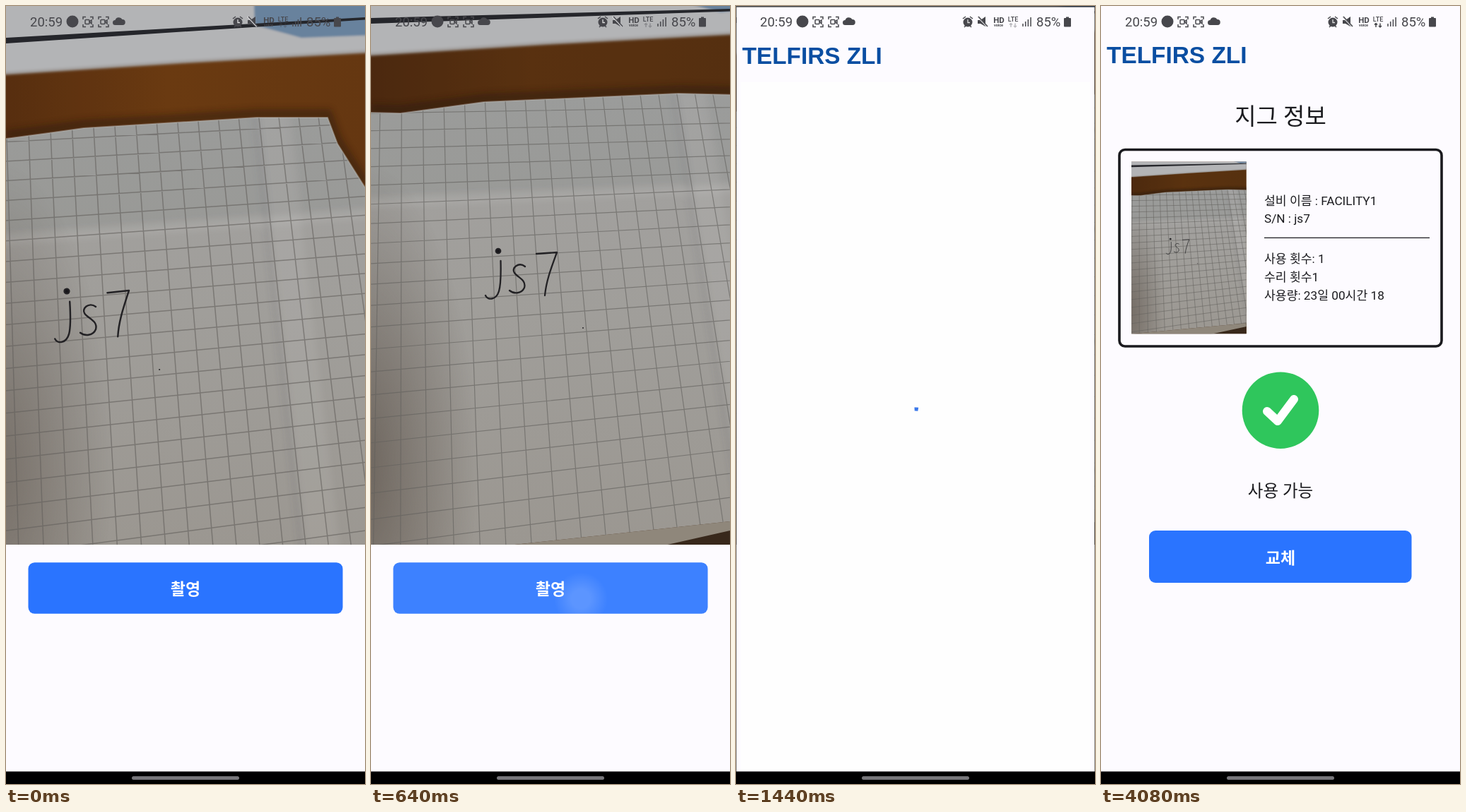
Write an HTML page that moves like this. It is 508 px wide and 1102 px high and loops after 4160 ms.

```html
<!DOCTYPE html>
<html lang="ko">
<head>
<meta charset="utf-8">
<title>Jig check</title>
<style>
html, body { margin: 0; width: 100%; height: 100%; overflow: hidden; background: #fdfbff; }
svg { display: block; width: 100vw; height: 100vh; }
text { font-family: Roboto, "Noto Sans CJK KR", sans-serif; fill: #1b1b1f; }
.mid { text-anchor: middle; }
.btn { fill: #2a74ff; }
.btnText { fill: #fff; font-size: 23px; font-weight: 700; text-anchor: middle; }
.row { font-size: 17.2px; }
.brand { font: bold 33.4px "Liberation Sans", sans-serif; fill: #0a4ea2; }
.line { fill: none; stroke: #48484d; stroke-width: 1.5; }
#status text { fill: #47474c; }
#status { fill: #47474c; }
</style>
</head>
<body>
<svg viewBox="0 0 508 1102" preserveAspectRatio="none">
<defs>
  <linearGradient id="wood">
    <stop offset="0" stop-color="#5d3110"/><stop offset=".45" stop-color="#713e12"/><stop offset="1" stop-color="#6c3b12"/>
  </linearGradient>
  <linearGradient id="sheet" gradientUnits="userSpaceOnUse" x1="300" y1="110" x2="240" y2="763">
    <stop offset="0" stop-color="#a3a2a1"/><stop offset=".5" stop-color="#a09e9a"/><stop offset="1" stop-color="#9b9791"/>
  </linearGradient>
  <radialGradient id="warm" gradientUnits="userSpaceOnUse" cx="0" cy="0" r="1" gradientTransform="translate(-15 650) scale(165 430)">
    <stop offset="0" stop-color="#3d3026"/><stop offset="1" stop-color="#3d3026" stop-opacity="0"/>
  </radialGradient>
  <radialGradient id="glow">
    <stop offset=".35" stop-color="#fff"/><stop offset="1" stop-color="#fff" stop-opacity="0"/>
  </radialGradient>
  <filter id="soft" filterUnits="userSpaceOnUse" x="0" y="0" width="508" height="763"><feGaussianBlur id="blur" stdDeviation="0"/></filter>
  <filter id="edgeBlur" filterUnits="userSpaceOnUse" x="-20" y="-120" width="548" height="903"><feGaussianBlur stdDeviation="1.500"/></filter>
  <filter id="haze" filterUnits="userSpaceOnUse" x="-20" y="-20" width="548" height="803"><feGaussianBlur stdDeviation="5"/></filter>
  <clipPath id="view"><rect width="508" height="763"/></clipPath>
  <clipPath id="paperClip"><path id="paperCut"/></clipPath>
  <clipPath id="btnClip"><rect x="31.500" y="788.200" width="445" height="72.600" rx="9"/></clipPath>

  <g id="scene" clip-path="url(#view)">
    <rect width="508" height="763" fill="url(#wood)"/>
    <rect id="dim" width="508" height="763" fill="#2a1a0c"/>
    <g filter="url(#edgeBlur)">
      <path id="desk" fill="#b3b4b6"/>
      <path id="patch" fill="#67829d"/>
      <path id="deskEdge" fill="none" stroke="#8f8a86" stroke-width="6" opacity=".4"/>
    </g>
    <path id="bar" fill="#25262b"/>
    <path id="under" fill="#38281b"/>
    <path id="lower" fill="#8f877b"/>
    <path id="shade" fill="none" stroke="#28150a" stroke-width="14" opacity=".45" filter="url(#haze)"/>
    <path id="paper" fill="url(#sheet)"/>
    <g clip-path="url(#paperClip)">
      <g filter="url(#haze)">
        <path id="foldTop" fill="#55565c" opacity=".08"/>
        <path id="foldRow" fill="#fff" opacity=".08"/>
        <path id="foldCol" fill="#55565c" opacity=".14"/>
        <path id="foldSide" fill="#fff" opacity=".07"/>
      </g>
      <rect id="tint" width="508" height="763" fill="url(#warm)"/>
      <g filter="url(#soft)">
        <path id="grid" fill="none" stroke="#625f5c"/>
        <g id="ink" fill="none" stroke="#222124" stroke-width="2.300" stroke-linecap="round" stroke-linejoin="round">
          <circle r="3.200" fill="#17161a"/>
          <path d="M3.500 14C4 34 4 47 1 57C-3 70 -15 70 -18 63M38 22C29 15 18 24 23 31C28 38 40 41 37 52C33 61 22 61 16 56M54 4L83 2C75 24 68 42 66 63"/>
          <circle cx="120" cy="109" r=".4" stroke-width="1.200"/>
        </g>
      </g>
    </g>
    <path id="rim" fill="none" stroke="#c4c2bf" stroke-width="2" opacity=".4"/>
  </g>
</defs>

<rect width="508" height="1102" fill="#fdfbff"/>

<g id="camera">
  <use href="#scene"/>
  <rect class="btn" x="31.500" y="788.200" width="445" height="72.600" rx="9"/>
  <g clip-path="url(#btnClip)" fill="#fff">
    <rect id="press" x="31" y="788" width="446" height="73"/>
    <circle id="ripple" cx="297" cy="840" fill="url(#glow)"/>
  </g>
  <text class="btnText" x="254" y="834">촬영</text>
</g>

<rect id="scrim" width="508" height="1102"/>
<g id="loader">
  <rect width="508" height="1102" fill="#fdfbff"/>
  <rect x="6" y="106" width="496" height="978" fill="#fefefe"/>
  <text class="brand" x="8" y="81">TELFIRS ZLI</text>
  <path id="spin" fill="none" stroke="#3a78ea" stroke-width="5"/>
</g>

<g id="result">
  <text class="brand" x="8" y="81">TELFIRS ZLI</text>
  <text class="mid" x="254" y="168" font-size="33">지그 정보</text>
  <rect x="26" y="203.500" width="456" height="278.500" rx="8" fill="none" stroke="#1a1a1e" stroke-width="3.600"/>
  <use href="#scene" transform="translate(43 220.500) scale(.3205 .3195)"/>
  <g class="row">
    <text x="231" y="282">설비 이름 : FACILITY1</text>
    <text x="231" y="307">S/N : js7</text>
    <text x="231" y="364">사용 횟수: 1</text>
    <text x="231" y="390">수리 횟수1</text>
    <text x="231" y="416">사용량: 23일 00시간 18</text>
  </g>
  <path d="M231 328.300H465" stroke="#1b1b1f" stroke-width="1.300"/>
  <circle cx="254" cy="572.700" r="54.300" fill="#2fc65c"/>
  <path d="M235 574L250 588L273 557" fill="none" stroke="#fff" stroke-width="12" stroke-linecap="round" stroke-linejoin="round"/>
  <text class="mid" x="254" y="695" font-size="23.500">사용 가능</text>
  <rect class="btn" x="68" y="743" width="371.500" height="74" rx="9"/>
  <text class="btnText" x="254" y="790">교체</text>
</g>

<g id="status">
  <text x="34" y="29" font-size="18.500">20:59</text>
  <circle cx="94" cy="22" r="8.500"/>
  <g id="shot" class="line">
    <path d="M109 19V15.500H113M119 15.500H123V19M123 26V29.500H119M113 29.500H109V26"/>
    <rect x="112" y="19.500" width="6" height="6" rx="1"/><path d="M118 22L121 20V25Z"/>
  </g>
  <use href="#shot" x="22"/>
  <path d="M154.500 27a3.500 3.500 0 0 1 0-7a5.500 5.500 0 0 1 10-1a4 4 0 0 1 .500 8z"/>
  <circle cx="328" cy="23" r="6.500"/>
  <path d="M321 18L325 15M335 18L331 15M323 30L325 28M333 30L331 28" class="line"/>
  <path d="M328 19V23.500H331" fill="none" stroke="#ddd" stroke-width="1.300"/>
  <path d="M342 20H346L353 15V29L346 25H342Z"/>
  <path d="M342 15L355 29" stroke="#e4e4e6" stroke-width="2"/><path d="M343 15L356 29" class="line"/>
  <g font-weight="700" text-anchor="middle">
    <text x="372" y="24" font-size="11.500">HD</text>
    <text x="371.500" y="28.500" font-size="5.500">voice</text>
    <text x="392" y="22" font-size="9" font-weight="500">LTE</text>
  </g>
  <path id="arrows" d="M389 30V24.500M387 26.500L389 24.500L391 26.500M395 24.500V30M393 28L395 30L397 28" class="line"/>
  <path d="M406 29V25M409.700 29V22M413.400 29V19M417.100 29V16" class="line"/>
  <text x="425" y="29" font-size="18.500">85%</text>
  <path d="M467 15.500H471V17H473Q474 17 474 18V28.500Q474 29.500 473 29.500H465Q464 29.500 464 28.500V18Q464 17 465 17H467Z"/>
</g>

<rect y="1084.300" width="508" height="18"/>
<rect x="178" y="1091" width="152" height="5" rx="2.500" fill="#77767a"/>
</svg>
<script>
const LOOP = 4160, STEP = 80, PHOTO_END = 1200, ZOOM = 1230, READY = 1440, DONE = 1600;

// Camera poses: quad = corners of a 14 x 13 cell block, top = paper edge,
// desk = desk and bar heights left/right, low = heights of the two lower edges,
// look = blur, shadow on the paper, darkness of the wood.
const poses = [
  { at: 0, quad: [-60, 337, 374, 306, 416, 690, -54, 750],
    top: [0, 188, 60, 180, 110, 173, 355, 158, 455, 158, 469, 195, 508, 257],
    desk: [97, 66, 49, 18], patch: [348, 45], low: [900, 900, 960, 960],
    ink: [86, 404, 1.06, -2], look: [.3, .4, .1] },
  { at: 160, quad: [10, 281, 468, 262, 532, 690, 8, 741],
    top: [0, 134, 60, 130, 180, 110, 450, 90, 530, 91, 560, 130, 600, 190],
    desk: [38, -8, -20, -60], patch: [400, -20], low: [850, 820, 920, 850],
    ink: [162, 352, 1.14, -2], look: [1.1, .6, .2] },
  { at: 640, quad: [43, 279, 455, 262, 514, 628, 42, 685],
    top: [0, 151, 42, 152, 160, 136, 435, 124, 520, 126, 545, 160, 580, 220],
    desk: [70, 40, 21, 6], patch: [425, 9], low: [785, 730, 858, 743],
    ink: [180, 347, 1, 0], look: [0, .5, .34] },
  { at: 1200, quad: [35, 275, 445, 260, 501, 616, 35, 677],
    top: [0, 150, 40, 150, 150, 136, 425, 124, 515, 126, 540, 160, 570, 220],
    desk: [68, 35, 20, 9], patch: [412, 7], low: [764, 716, 841, 731],
    ink: [172, 343, 1, 0], look: [0, .45, .32] }
];

const el = id => document.getElementById(id);
const set = (id, attrs) => { for (const k in attrs) el(id).setAttribute(k, attrs[k]); };
const show = (id, on) => el(id).style.display = on ? '' : 'none';
const clamp = x => Math.max(0, Math.min(1, x));
const path = pts => 'M' + pts.map(p => p[0].toFixed(1) + ' ' + p[1].toFixed(1)).join('L');
const pairs = a => a.flatMap((v, i) => i % 2 ? [] : [[v, a[i + 1]]]);

function poseAt(t) {
  let i = 0;
  while (i < poses.length - 2 && t >= poses[i + 1].at) i++;
  const a = poses[i], b = poses[i + 1];
  let u = clamp((t - a.at) / (b.at - a.at));
  if (i === 1) u = 1 - (1 - u) ** 2;
  const out = {};
  for (const k in a) if (k !== 'at') out[k] = a[k].map((v, j) => v + (b[k][j] - v) * u);
  return out;
}

// Projective map from cell coordinates to the screen.
function projector([x0, y0, x1, y1, x2, y2, x3, y3]) {
  const sx = x0 - x1 + x2 - x3, sy = y0 - y1 + y2 - y3;
  const ax = x1 - x2, ay = y1 - y2, bx = x3 - x2, by = y3 - y2;
  const det = ax * by - bx * ay;
  const g = (sx * by - bx * sy) / det, h = (ax * sy - sx * ay) / det;
  return (col, row) => {
    const u = (col + 5) / 14, v = row / 13, w = 1 + g * u + h * v;
    return [((x1 - x0 + g * x1) * u + (x3 - x0 + h * x3) * v + x0) / w,
            ((y1 - y0 + g * y1) * u + (y3 - y0 + h * y3) * v + y0) / w];
  };
}

function drawScene(t, thumb) {
  const p = poseAt(t), at = projector(p.quad);
  const [dl, dr, bl, br] = p.desk, [l1, r1, l2, r2] = p.low, [px, py] = p.patch;
  const [blur, shadow, dim] = p.look;
  const block = (a, b, c, d) => path([at(a, b), at(c, b), at(c, d), at(a, d)]) + 'Z';

  const deskLine = [[-20, dl + 1], [250, (dl + dr) / 2 - 1], [528, dr - 1]];
  set('dim', { opacity: dim });
  set('desk', { d: path([[-20, -90], ...deskLine, [528, -90]]) + 'Z' });
  set('deskEdge', { d: path(deskLine.map(([x, y]) => [x, y - 1])) });
  set('patch', { d: path([[px, -90], [px + 4, py - 18], [px + 70, py], [528, py - 4], [528, -90]]) + 'Z' });
  set('bar', { d: path([[0, bl - 4], [508, br - 2], [508, br + 1.5], [0, bl + 4]]) + 'Z' });

  const edge = pairs(p.top);
  const sheet = path([...edge, [620, 300], [620, r1 - (l1 - r1) * .22], [508, r1], [0, l1]]) + 'Z';
  set('paper', { d: sheet });
  set('paperCut', { d: sheet });
  set('rim', { d: path(edge) });
  set('shade', { d: path(edge.map(([x, y]) => [x, y - 5])) });
  set('under', { d: path([[0, l1], [508, r1], [508, 900], [0, 1000]]) + 'Z' });
  set('lower', { d: path([[0, l1], [508, r1], [508, r2], [0, l2]]) + 'Z' });

  set('foldTop', { d: block(-9, -7, 14, -.2) });
  set('foldRow', { d: block(-9, -.3, 14, .2) });
  set('foldCol', { d: block(8.7, -6, 9, 16) });
  set('foldSide', { d: block(9, -6, 10.5, 16) });
  set('tint', { opacity: shadow });

  let d = '';
  for (let c = -9; c <= 16; c++) d += path([at(c, -7), at(c, 18)]);
  for (let r = -7; r <= 18; r++) d += path([at(-9, r), at(16, r)]);
  set('grid', { d, 'stroke-width': thumb ? 2.2 : 1.2 + blur, opacity: thumb ? .75 : .62 - blur * .08 });
  set('blur', { stdDeviation: blur });
  const [ix, iy, size, turn] = p.ink;
  set('ink', { transform: `translate(${ix} ${iy}) rotate(${turn}) scale(${size})` });
}

function drawPress(t) {
  const on = t >= 640, d = t - 640;
  set('press', { opacity: on ? .03 + .06 * clamp(1 - d / 520) : 0 });
  set('ripple', { r: on ? 38 + d * .9 : 0, opacity: on ? .16 * clamp(1 - d / 400) : 0 });
}

function drawLoader(t) {
  const u = clamp((t - ZOOM) / 265), ease = 1 - (1 - u) ** 2.5, s = .85 + .15 * ease;
  set('scrim', { opacity: .6 * clamp(u * 2) });
  set('loader', { opacity: clamp(u * 3), transform: `translate(254 551) scale(${s}) translate(-254 -551)` });
  const d = t - READY, a0 = .03 + d * .002, a1 = a0 + .26 + d * .0065;
  const point = a => [254 + 20 * Math.sin(a), 591 - 20 * Math.cos(a)];
  const [p, q] = [point(a0 - .1), point(a1 - .1)];
  set('spin', { d: d < 0 ? '' : `M${p}A20 20 0 0 1 ${q}` });
}

function draw(ms) {
  const t = Math.floor(ms % LOOP / STEP) * STEP;
  const done = t >= DONE, loading = t >= ZOOM && !done;
  show('camera', !done);
  show('loader', loading);
  show('scrim', loading);
  show('result', done);
  set('arrows', { opacity: done ? 1 : .35 });
  drawScene(Math.min(t, PHOTO_END), done);
  if (!done) drawPress(t);
  if (loading) drawLoader(t);
}

let start;
function tick(now) {
  if (start === undefined) start = now;
  draw(now - start);
  requestAnimationFrame(tick);
}
draw(0);
requestAnimationFrame(tick);
</script>
</body>
</html>
```
